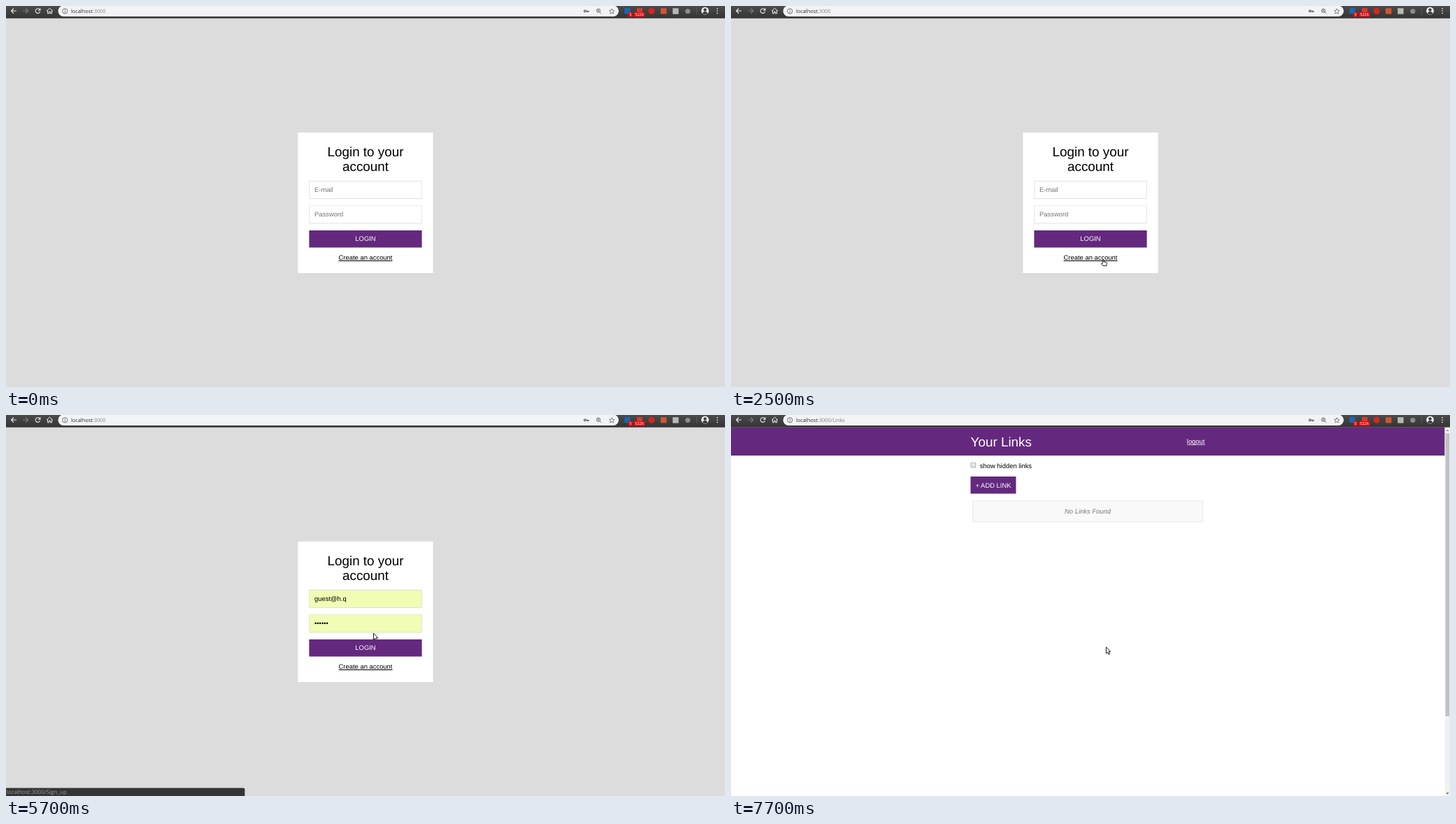
Animation, 1028 px wide and 545 px high, one loop 8 s. Source, as an HTML page with a canvas:

```html
<!DOCTYPE html>
<html lang="en">
<head>
<meta charset="utf-8">
<title>Login flow</title>
<style>
html, body { margin: 0; width: 100%; height: 100%; overflow: hidden; background: #dcdcdc; }
canvas { display: block; }
</style>
</head>
<body>
<canvas id="stage" width="1028" height="545"></canvas>
<script>
const ctx = document.getElementById('stage').getContext('2d');
const LOOP = 8000, STEP = 100;
const PURPLE = '#64297f';
const SANS = '"Liberation Sans", Arial, sans-serif';
const UI = '"Open Sans", "Noto Sans", sans-serif';
const BODY = `9.42px ${SANS}`, TITLE = `18.85px ${SANS}`;

// Pointer moves: start time, number of steps, hotspot x, hotspot y
const moves = [
  [400, 1, 432.6, 71.6], [500, 1, 519.5, 259], [700, 9, 540, 343.6],
  [1600, 2, 540, 330.6], [1900, 7, 532, 362.6], [5700, 1, 525.5, 312],
  [6100, 1, 526.5, 257], [6700, 1, 546.5, 311.4], [7100, 1, 536.6, 330.8],
  [7700, 1, 536.4, 331.8]
];

function rect(x, y, w, h, fill, radius = 0) {
  ctx.fillStyle = fill;
  ctx.beginPath();
  ctx.roundRect(x, y, w, h, radius);
  ctx.fill();
}

function frame(x, y, w, h, fill, line) {
  rect(x, y, w, h, line);
  rect(x + 0.7, y + 0.7, w - 1.4, h - 1.4, fill);
}

function disc(x, y, r, fill) {
  ctx.fillStyle = fill;
  ctx.beginPath();
  ctx.arc(x, y, r, 0, Math.PI * 2);
  ctx.fill();
}

function ring(x, y, r, color, width = 0.9) {
  ctx.strokeStyle = color;
  ctx.lineWidth = width;
  ctx.beginPath();
  ctx.arc(x, y, r, 0, Math.PI * 2);
  ctx.stroke();
}

function text(s, x, y, font, color, align = 'left') {
  ctx.font = font;
  ctx.fillStyle = color;
  ctx.textAlign = align;
  ctx.fillText(s, x, y);
  return ctx.measureText(s).width;
}

function link(s, x, y, color, align = 'left') {
  const w = text(s, x, y, BODY, color, align);
  rect(align === 'center' ? x - w / 2 : x, y + 0.9, w, 0.8, color);
}

function shape(d, x, y, stroke, width, fill) {
  const path = new Path2D(d);
  ctx.save();
  ctx.translate(x, y);
  if (fill) {
    ctx.fillStyle = fill;
    ctx.fill(path);
  }
  if (stroke) {
    ctx.strokeStyle = stroke;
    ctx.lineWidth = width;
    ctx.stroke(path);
  }
  ctx.restore();
}

function badge(label, x, w) {
  rect(x, 8.8, w, 7, '#dd0c14', 1);
  text(label, x + w / 2, 14.4, `5.6px ${UI}`, '#fff', 'center');
}

function toolbar(path) {
  const shade = ctx.createLinearGradient(0, 0, 0, 17.6);
  shade.addColorStop(0, '#4b4b4b');
  shade.addColorStop(1, '#343434');
  rect(0, 0, 1028, 17.6, shade);

  const light = '#eeeeee', grey = '#5f6368';
  shape('M4 0H-3.4M0 -3.5L-3.5 0L0 3.5', 11, 7, light, 1.1);
  shape('M-4 0H3.4M0 -3.5L3.5 0L0 3.5', 28.2, 7, '#7d7d7d', 1.1);
  shape('M3 -1.6A3.3 3.3 0 1 0 3.2 1M3.5 -3.8V-0.9H0.6', 45.4, 7.1, light, 1.1);
  shape('M-4.4 0.2L0 -3.8L4.4 0.2M-3 -0.8V3.8H-0.9V1H0.9V3.8H3V-0.8', 62.5, 7, light, 1);

  rect(74.5, -0.5, 801.5, 15.5, '#f1f3f4', 7.7);
  ring(84.2, 7.3, 3.6, grey);
  rect(83.8, 6.7, 0.9, 2.7, grey);
  rect(83.8, 5, 0.9, 0.9, grey);
  const font = `7.35px ${UI}`;
  const w = text('localhost', 93, 10, font, '#26282b');
  text(':3000' + path, 93 + w, 10, font, '#80848a');

  ring(827.8, 7.3, 1.4, grey, 1.3);
  shape('M1.8 0H6M3.6 0V1.8M5.2 0V1.8', 827.5, 7.3, grey, 1.3);
  ring(847, 6.7, 2.6, grey, 1);
  shape('M1.9 1.9L4.2 4.2M-1.2 0H1.2M0 -1.2V1.2', 847, 6.7, grey, 0.9);
  shape('M0 -3.6L1.1 -1.2L3.7 -0.9L1.8 0.9L2.3 3.5L0 2.2L-2.3 3.5L-1.8 0.9L-3.7 -0.9L-1.1 -1.2Z',
    866.2, 7.4, grey, 0.8);

  rect(884.3, 3, 8.2, 8.2, '#1769b5');
  badge('5', 889.6, 6.4);
  rect(902, 3, 8, 7, '#d93a32');
  badge('5226', 897.6, 16);
  disc(923, 7.3, 4.5, '#d9251d');
  rect(936, 3.2, 8.4, 8.2, '#d2542f');
  rect(953.2, 3.2, 8.4, 8.4, '#b9b9b5');
  disc(974.8, 7.5, 3.6, '#8c8c8c');
  rect(987.3, 2.5, 0.6, 10, '#666');

  disc(999.5, 7, 5.4, '#f3f3f3');
  disc(999.5, 5.5, 2.2, '#3b3b3b');
  shape('M-3.7 3.4Q-3 1 0 1Q3 1 3.7 3.4Q0 6.4 -3.7 3.4Z', 999.5, 7, null, 0, '#3b3b3b');
  for (const y of [3.7, 7, 10.3]) disc(1017, y, 0.85, light);
}

function field(y, value, hint) {
  frame(433.4, y, 161.2, 25.8, value ? '#f1fdb5' : '#fff', value ? '#d5d9bd' : '#d8d8d8');
  text(value || hint, 441, y + 15.6, BODY, value ? '#000' : '#757575');
}

function card(lines, filled, action, other) {
  rect(0, 17.6, 1028, 527.4, '#dcdcdc');
  rect(417.4, 181, 193.2, 201, '#fff');
  lines.forEach((s, i) => text(s, 514, 214.6 + i * 21.4, TITLE, '#000', 'center'));
  field(250, filled && 'guest@h.q', 'E-mail');
  field(285.4, filled && '••••••', 'Password');
  rect(433.4, 320.9, 161.2, 24.7, PURPLE);
  text(action, 514, 336, BODY, '#fff', 'center');
  link(other, 514, 363.2, '#000', 'center');
}

function linksPage() {
  rect(0, 17.6, 1028, 527.4, '#fff');
  rect(0, 17.6, 1020.6, 40.3, PURPLE);
  text('Your Links', 342.6, 44.6, TITLE, '#fff');
  link('logout', 651.8, 41, '#fff');

  const shade = ctx.createLinearGradient(0, 68, 0, 75.6);
  shade.addColorStop(0, '#eeeeee');
  shade.addColorStop(1, '#dddddd');
  rect(342.6, 67.9, 7.6, 7.6, '#a3a3a3', 1);
  rect(343.4, 68.7, 6, 6, shade);
  text('show hidden links', 355.8, 76.2, BODY, '#000');

  rect(342.5, 88, 65, 24.6, PURPLE);
  text('+ ADD LINK', 375, 103.5, BODY, '#fff', 'center');
  frame(345.4, 122.6, 329.4, 30.8, '#f9f9f9', '#e2e2e2');
  text('No Links Found', 510, 141.2, `italic ${BODY}`, '#777', 'center');

  rect(1020.6, 17.6, 7.4, 527.4, '#f1f1f1');
  rect(1021.6, 26, 5.6, 405, '#c1c1c1');
  shape('M-2 1L0 -1.2L2 1Z', 1024.4, 22, null, 0, '#8a8a8a');
  shape('M-2 -1L0 1.2L2 -1Z', 1024.4, 541.2, null, 0, '#505050');
}

function statusBar(s) {
  rect(0, 533.6, 341.4, 11.4, '#353535', [0, 2, 0, 0]);
  text(s, 0.8, 542.3, `8px ${UI}`, '#9b9b9b');
}

function pointerAt(t) {
  let x = 0, y = 0;
  for (const [start, steps, toX, toY] of moves) {
    if (t < start) break;
    const p = Math.min(1, (Math.floor((t - start) / STEP) + 1) / steps);
    const e = p * p * (3 - 2 * p);
    x += (toX - x) * e;
    y += (toY - y) * e;
  }
  return [x, y];
}

function pointer(t) {
  if (t < moves[0][0]) return;
  const [x, y] = pointerAt(t);
  const within = (top, bottom) => t < 7700 && y >= top && y <= bottom;
  if (within(250, 276) || within(285, 311.5)) {
    shape('M-2 -4.6H-0.6L0 -4L0.6 -4.6H2M0 -4V4M-2 4.6H-0.6L0 4L0.6 4.6H2', x, y, '#222', 0.9);
  } else if (within(320.9, 345.6) || within(354.5, 366)) {
    shape('M-0.8 0.6Q0 -0.4 0.8 0.6V3.3L4.6 4Q5.7 4.3 5.5 5.6L4.8 9H-0.2L-2.4 6.2Q-2.7 4.8 -0.8 5.7Z',
      x, y, '#111', 0.95, '#fff');
  } else {
    shape('M0 0V9.4L2.2 7.4L3.6 10.7L5.1 10L3.7 6.9H6.4Z', x, y, '#111', 0.95, '#fff');
  }
}

function draw(t) {
  const login = ['Login to your', 'account'];
  let path = '';
  if (t >= 7700) {
    path = '/Links';
    linksPage();
  } else if (t >= 3300 && t < 5100) {
    path = '/Sign_up';
    card(['Sign up', 'component here'], true, 'CREATE ACCOUNT', 'Have an account ?');
  } else {
    card(login, t >= 5700, 'LOGIN', 'Create an account');
  }
  toolbar(path);
  if (t >= 3300 && t < 6100) statusBar('localhost:3000' + (t < 5100 ? '' : '/Sign_up'));
  pointer(t);
}

ctx.textRendering = 'geometricPrecision';
const began = performance.now();
function tick() {
  draw((performance.now() - began) % LOOP);
  requestAnimationFrame(tick);
}
tick();
</script>
</body>
</html>
```
